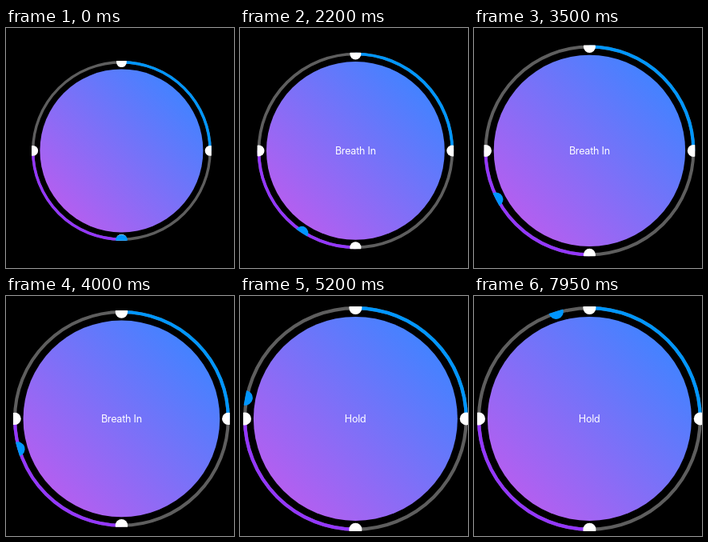
An HTML page for the animation above (8000 ms loop, 285 px wide and 300 px high).

```html
<!DOCTYPE html>
<html lang="en">
<head>
<meta charset="utf-8">
<title>Breathing exercise</title>
<style>
  html, body { margin: 0; width: 100%; height: 100%; overflow: hidden; background: #000; }
  svg { display: block; width: 100%; height: 100%; }
  text { font: 12.5px Inter, sans-serif; letter-spacing: -0.2px; fill: #fff; text-anchor: middle; }
</style>
</head>
<body>
<svg viewBox="0 0 285 300">
  <defs>
    <linearGradient id="fill" x1="0.146" y1="0.854" x2="0.854" y2="0.146">
      <stop offset="0" stop-color="#b35ff0"/>
      <stop offset="1" stop-color="#4482ff"/>
    </linearGradient>
    <clipPath id="box"><rect x="-112.4" y="-112.4" width="224.8" height="224.8"/></clipPath>
  </defs>
  <rect width="285" height="300" fill="#000"/>
  <g id="dial">
    <circle r="102" fill="url(#fill)"/>
    <g fill="none" stroke-width="3.4">
      <circle r="110.7" stroke="#5e5e5e"/>
      <path d="M0-110.7A110.7 110.7 0 0 1 110.7 0" stroke="#0096ff"/>
      <path d="M0 110.7A110.7 110.7 0 0 1-110.7 0" stroke="#9437ff"/>
    </g>
    <g fill="#fff" clip-path="url(#box)">
      <circle cy="-110.7" r="6.4"/>
      <circle cx="110.7" r="6.4"/>
      <circle cy="110.7" r="6.4"/>
      <circle cx="-110.7" r="6.4"/>
    </g>
    <g id="marker" clip-path="url(#box)">
      <circle cy="112.2" r="7.45" fill="#0096ff"/>
    </g>
  </g>
  <text id="inhale" x="144.4" y="158">Breath In</text>
  <text id="hold" x="144.2" y="158">Hold</text>
</svg>
<script>
  const LOOP = 8000, START = 725, PHASE = 4000, FADE = 350;
  const [dial, marker, inhale, hold] =
    ['dial', 'marker', 'inhale', 'hold'].map(id => document.getElementById(id));

  const clamp = x => Math.min(1, Math.max(0, x));
  const ease = x => x * x * (3 - 2 * x);
  const fade = (t, from) => ease(clamp((t - from) / FADE));

  function draw(t) {
    const phases = Math.max(0, t - START) / PHASE;
    const scale = 1 + 0.25 * clamp(phases);
    const holding = fade(t, START + PHASE);
    dial.setAttribute('transform', `translate(144.4 153.4) scale(${scale})`);
    marker.setAttribute('transform', `rotate(${90 * phases})`);
    inhale.setAttribute('opacity', fade(t, START) * (1 - holding));
    hold.setAttribute('opacity', holding);
  }

  const begin = performance.now();
  function tick() {
    draw((performance.now() - begin) % LOOP);
    requestAnimationFrame(tick);
  }
  tick();
</script>
</body>
</html>
```
